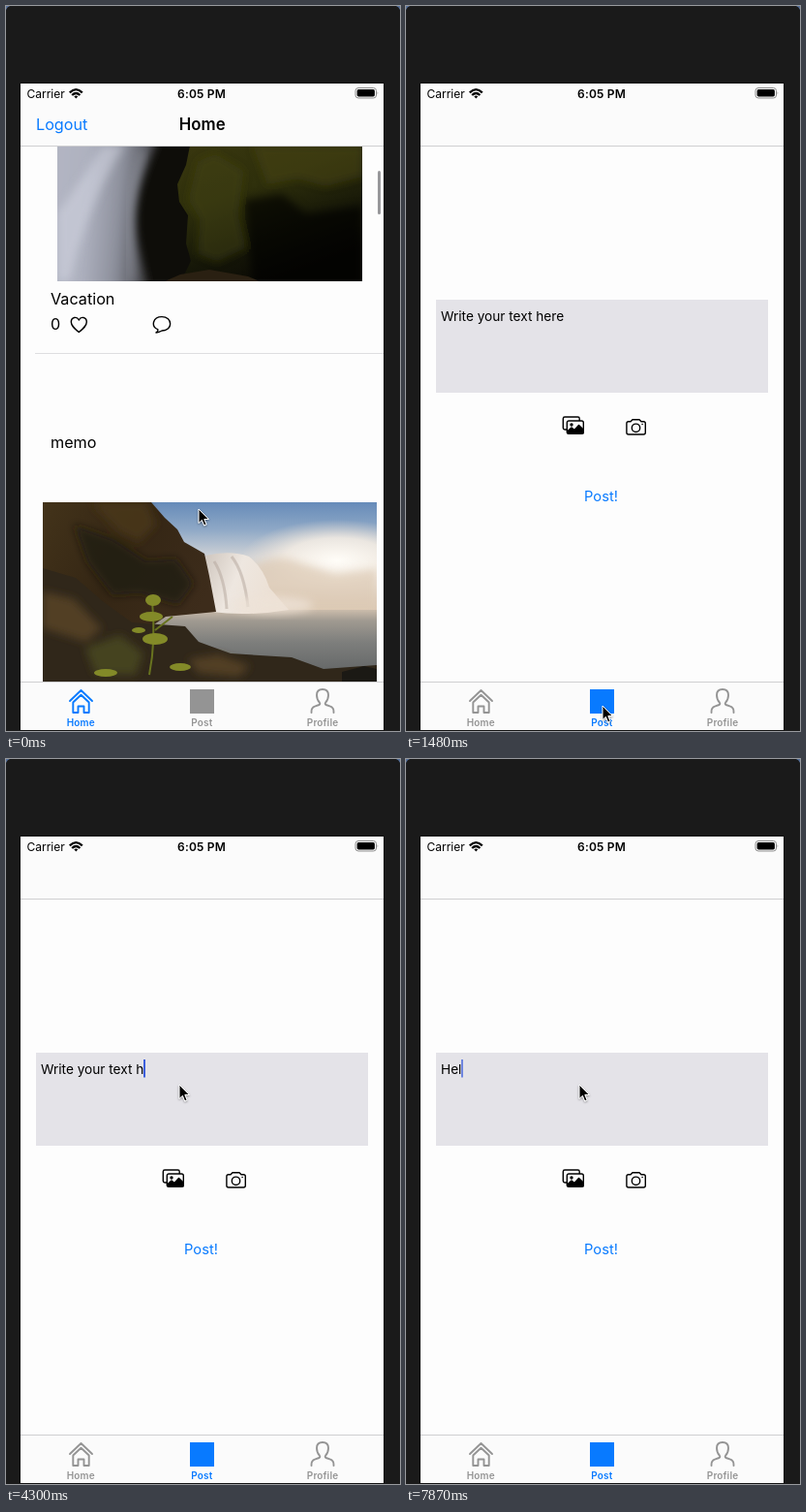
Animation of 407 by 748 pixels, one loop 8000 ms. Source, as an HTML page:

```html
<!DOCTYPE html>
<html lang="en">
<head>
<meta charset="utf-8">
<title>Photo feed</title>
<style>
  html, body { margin: 0; width: 100%; height: 100%; overflow: hidden; background: #1a1a1a; }
  #stage { display: block; width: 100%; height: 100%; }
  text { font-family: Inter, sans-serif; font-size: 16.2px; fill: #000; white-space: pre; }
  .mid { text-anchor: middle; }
  .bold { font-weight: 600; }
  .status { font-size: 12px; }
  .field { font-size: 13.65px; }
  .tab { color: #949494; }
  .tab.on { color: #087aff; }
  .tab text { font-size: 10px; font-weight: 600; letter-spacing: .15px; fill: currentColor; }
  .line { fill: none; stroke: #000; stroke-width: 1.4; stroke-linejoin: round; stroke-linecap: round; }
  .tab .line { stroke: currentColor; stroke-width: 1.9; }
  .link { fill: #087aff; }
</style>
</head>
<body>
<svg id="stage" viewBox="0 0 407 748" preserveAspectRatio="none">
  <defs>
    <linearGradient id="stream" x1="0" y1="0" x2="1" y2=".12">
      <stop offset="0" stop-color="#b4b7c4"/><stop offset=".4" stop-color="#aeb1bf"/>
      <stop offset=".68" stop-color="#8d909c"/><stop offset=".88" stop-color="#56575d"/>
      <stop offset="1" stop-color="#1d1a17"/>
    </linearGradient>
    <linearGradient id="moss" x1="0" y1="0" x2=".5" y2="1">
      <stop offset="0" stop-color="#39370f"/><stop offset=".4" stop-color="#2f300c"/>
      <stop offset=".75" stop-color="#161708"/><stop offset="1" stop-color="#0b0a05"/>
    </linearGradient>
    <linearGradient id="sky" x2="0" y2="1">
      <stop offset="0" stop-color="#668bb9"/><stop offset=".15" stop-color="#8ea8c6"/>
      <stop offset=".3" stop-color="#cfd2d6"/><stop offset=".45" stop-color="#e9dfd4"/>
      <stop offset=".6" stop-color="#dccab5"/>
    </linearGradient>
    <radialGradient id="glow">
      <stop offset="0" stop-color="#fffdf8"/><stop offset=".55" stop-color="#f6eee4" stop-opacity=".85"/>
      <stop offset="1" stop-color="#e9ddd0" stop-opacity="0"/>
    </radialGradient>
    <linearGradient id="lake" x2="0" y2="1">
      <stop offset="0" stop-color="#cbbcab"/><stop offset=".15" stop-color="#a09a91"/>
      <stop offset=".45" stop-color="#7d7e7c"/><stop offset="1" stop-color="#5c5f60"/>
    </linearGradient>
    <linearGradient id="cliff" x2="1" y2=".5">
      <stop offset="0" stop-color="#43331a"/><stop offset=".5" stop-color="#342614"/>
      <stop offset="1" stop-color="#3d2c1b"/>
    </linearGradient>
    <linearGradient id="fall" x2="1" y2=".3">
      <stop offset="0" stop-color="#cfc6be"/><stop offset=".45" stop-color="#eee7e0"/>
      <stop offset="1" stop-color="#ecdfd2"/>
    </linearGradient>
    <filter id="haze" x="-30%" y="-30%" width="160%" height="160%"><feGaussianBlur stdDeviation="4"/></filter>
    <filter id="soft" x="-50%" y="-50%" width="200%" height="200%">
      <feDropShadow dx="0" dy="1" stdDeviation=".9" flood-opacity=".4"/>
    </filter>
  </defs>

  <rect width="407" height="748" fill="#1a1a1a"/>
  <path d="M0 0h4Q1 1 0 4zM407 0h-4q3 1 4 4z" fill="#566f98"/>
  <rect x="14" y="79" width="377" height="669" fill="#151515"/>
  <rect x="15" y="80" width="375" height="667" fill="#fdfdfd"/>

  <g id="home">
    <svg x="53" y="144" width="315" height="140" viewBox="53 144 315 140">
      <rect x="53" y="144" width="315" height="140" fill="#0e0d09"/>
      <path d="M40 130H162Q136 180 134 214T152 300H40z" fill="url(#stream)" filter="url(#haze)"/>
      <path d="M53 214Q86 168 100 144H122Q84 205 66 284H53z" fill="#d5d8e4" opacity=".5" filter="url(#haze)"/>
      <path d="M142 150Q124 195 130 284" fill="none" stroke="#c0c3cf" stroke-width="5" opacity=".3" filter="url(#haze)"/>
      <path d="M190 144L186 164L177 184L179 202L188 216L186 245L191 263L181 284H368V144z" fill="url(#moss)"/>
      <g filter="url(#haze)">
        <path d="M198 160L216 152L246 170L240 215L248 250L218 264L198 256L200 220L188 200z" fill="#464711" opacity=".45"/>
        <path d="M255 144H368V176L330 186L302 178L270 184z" fill="#474515" opacity=".55"/>
        <path d="M246 200L285 194L310 214L368 206V290H255z" fill="#080904" opacity=".65"/>
      </g>
      <path d="M164 284L180 277L210 272L250 279L262 284z" fill="#2a2012"/>
    </svg>
    <text x="46" y="308">Vacation</text>
    <text x="46" y="334">0</text>
    <path class="line" d="M75.300 336.500C71 333 67.300 330 67.300 326C67.300 320.800 73.300 319.800 75.300 324C77.300 319.800 83.300 320.800 83.300 326C83.300 330 79.600 333 75.300 336.500z"/>
    <path class="line" d="M155 337Q157.200 336 156.800 333.700C149.500 330.500 151.500 320.600 161 320.600C172.200 320.600 172.800 335 161 335Q158 336.900 155 337z"/>
    <rect x="30" y="358" width="360" height="1" fill="#dedee0"/>
    <text x="46" y="456">memo</text>

    <svg x="38" y="512" width="345" height="186" viewBox="38 512 345 186">
      <rect x="38" y="512" width="345" height="186" fill="url(#sky)"/>
      <ellipse cx="342" cy="572" rx="100" ry="42" fill="url(#glow)"/>
      <path d="M250 582Q268 568 290 570L315 578L340 586L383 581V626H250z" fill="#dcc9b4" opacity=".7" filter="url(#haze)"/>
      <rect x="150" y="623" width="233" height="75" fill="url(#lake)"/>
      <path d="M206 567Q232 561 251 568Q266 580 272 600L292 623Q250 630 212 625z" fill="url(#fall)"/>
      <path d="M215 573Q226 590 228 622M233 568Q246 584 250 620" fill="none" stroke="#b3a69b" stroke-width="3" opacity=".5"/>
      <ellipse cx="275" cy="618" rx="42" ry="9" fill="#eee3d8" opacity=".75" filter="url(#haze)"/>
      <path d="M38 512H150L164 528L177 540L184 553L205 565L210 588L217 625L165 630L120 660L38 670z" fill="url(#cliff)"/>
      <g filter="url(#haze)">
        <path d="M88 512H146L155 535L137 553L116 542z" fill="#4c3a19" opacity=".8"/>
        <path d="M70 535L112 550L145 572L176 570L194 596L178 618L138 606L110 608L84 574z" fill="#20180e" opacity=".7"/>
      </g>
      <path d="M38 580L72 590L101 615L130 636L185 640L199 656L232 668L295 672L328 684L383 680V698H38z" fill="#30271a"/>
      <g filter="url(#haze)">
        <path d="M38 604L70 612L99 642L83 656L38 642zM188 674L220 669L252 681L240 692L199 688z" fill="#5a4428" opacity=".8"/>
        <path d="M82 662L118 649L142 668L134 690L92 689z" fill="#4b4a1e" opacity=".8"/>
      </g>
      <path d="M347 698V687L370 681L383 684V698z" fill="#1b1914"/>
      <path d="M148 690Q155 655 151 614M154 644L172 630" fill="none" stroke="#68731f" stroke-width="2"/>
      <g fill="#838a28">
        <ellipse cx="152" cy="613" rx="8" ry="6"/><ellipse cx="150" cy="630" rx="12" ry="5"/>
        <ellipse cx="154" cy="653" rx="13" ry="6"/><ellipse cx="137" cy="644" rx="7" ry="3"/>
        <ellipse cx="103" cy="688" rx="12" ry="4"/><ellipse cx="180" cy="682" rx="11" ry="4"/>
      </g>
    </svg>
    <rect id="scrollbar" x="384" y="170" width="3" height="45" rx="1.500" fill="#98989b"/>
  </g>

  <g id="post">
    <rect x="31" y="303" width="343" height="96" fill="#e4e3e8"/>
    <text id="entry" class="field" x="36" y="324.500"></text>
    <rect id="caret" y="310" width="2" height="18.500" fill="#3d5fdc"/>
    <g class="line">
      <path d="M166 437H164Q162.300 437 162.300 435.300V425.700Q162.300 424 164 424H177.500Q179.200 424 179.200 425.700V428"/>
      <rect x="166.300" y="428" width="17" height="13.200" rx="2" fill="#fdfdfd"/>
      <path d="M166.500 439L171 435L174 437.500L178.500 432.500L183.200 437V440.800H167z" fill="#000"/>
      <circle cx="171" cy="432" r="1" fill="#000"/>
    </g>
    <g class="line">
      <path d="M229.800 428.800H232L234 426.700H241L243 428.800H245.400Q247.300 428.800 247.300 430.700V440Q247.300 442 245.400 442H229.800Q227.900 442 227.900 440V430.700Q227.900 428.800 229.800 428.800z"/>
      <circle cx="237.500" cy="435.300" r="4.200"/><path d="M244 431.500h.2"/>
    </g>
    <text class="mid link" x="201.500" y="510.500" style="font-size:14.700px">Post!</text>
  </g>

  <rect x="15" y="80" width="375" height="64" fill="#fbfbfb"/>
  <rect x="15" y="144" width="375" height="1" fill="#cfcfd1"/>
  <text class="status" x="21.500" y="94.500">Carrier</text>
  <g fill="none" stroke="#000" stroke-width="2.300">
    <path d="M65.800 89.300Q72.300 83 78.800 89.300M68.200 92Q72.300 88 76.400 92"/>
    <path d="M70.300 93.300Q72.300 91.800 74.300 93.300L72.300 95.600z" fill="#000" stroke="none"/>
  </g>
  <text class="status bold mid" x="202" y="94.500" style="letter-spacing:.2px">6:05 PM</text>
  <rect x="361" y="84.500" width="21.500" height="10.500" rx="3" fill="none" stroke="#8f8f8f"/>
  <rect x="362.600" y="86.100" width="18.300" height="7.300" rx="1.600"/>
  <path d="M383.600 88q1.500 1.700 0 3.500z" fill="#8f8f8f"/>
  <g id="title">
    <text class="link" x="31" y="128">Logout</text>
    <text class="bold mid" x="202.700" y="128" style="font-size:16.800px">Home</text>
  </g>

  <rect x="15" y="697" width="375" height="50" fill="#fbfbfb"/>
  <rect x="15" y="697" width="375" height="1" fill="#cfcfd1"/>
  <g id="homeTab" class="tab">
    <path class="line" d="M66 717L77.500 706L89 717M69.300 718.500V729H74.500V722.500H80.500V729H85.700V718.500M69.500 718.300L77.500 710.800L85.500 718.300"/>
    <text class="mid" x="77.300" y="743">Home</text>
  </g>
  <g id="postTab" class="tab">
    <rect x="190" y="705" width="25" height="25" fill="currentColor"/>
    <text class="mid" x="202.300" y="743">Post</text>
  </g>
  <g class="tab">
    <path class="line" d="M315.500 729Q315 723.500 319.500 722.300L323.500 721Q325 720 323.800 718.500Q321 715.500 321 711Q321 705 327 705Q333 705 333 711Q333 715.500 330.200 718.500Q329 720 330.500 721L334.500 722.300Q339 723.500 338.500 729"/>
    <text class="mid" x="327" y="743">Profile</text>
  </g>

  <path id="cursor" d="M0 0V14.500L3.400 11.400L5.700 17L8.100 16L5.800 10.500H10.400z" fill="#000" stroke="#fff" stroke-width="1" filter="url(#soft)"/>
</svg>
<script>
const LOOP = 8000, POST_AT = 1480, CARET_AT = 3110;
const PROMPT = 'Write your text here', REPLY = 'Hel';
const $ = id => document.getElementById(id);

// [time, x, y]; the pointer is off stage where y exceeds 748
const pointer = [
  [0, 199, 519], [150, 199, 598], [300, 199, 800], [600, 202, 729], [740, 202, 725],
  [1040, 202, 724], [1190, 203, 722], [1930, 201, 690], [2080, 188, 540], [2220, 179, 404],
  [2510, 180, 363], [2660, 180, 347], [2810, 179, 336]
];
// [time, letters left of the prompt]
const erasing = [
  [0, 20], [3700, 19], [4300, 17], [4450, 16], [4590, 15], [4740, 13], [4890, 11], [5040, 10],
  [5180, 8], [5330, 7], [5480, 6], [5630, 4], [5770, 3], [5920, 1], [6070, 0]
];
// [time, letters typed]
const typing = [[0, 0], [6670, 1], [7120, 2], [7720, 3]];
const scrollFade = [[0, 1], [1040, .4], [1190, 0]];

const at = (steps, t) => steps.findLast(step => step[0] <= t).slice(1);
const show = (id, on) => $(id).setAttribute('visibility', on ? 'visible' : 'hidden');

function render(t) {
  const posting = t >= POST_AT;
  show('home', !posting);
  show('title', !posting);
  show('post', posting);
  $('homeTab').classList.toggle('on', !posting);
  $('postTab').classList.toggle('on', posting);
  $('scrollbar').setAttribute('opacity', at(scrollFade, t)[0]);

  const entry = $('entry');
  entry.textContent = PROMPT.slice(0, at(erasing, t)[0]) + REPLY.slice(0, at(typing, t)[0]);
  const width = entry.textContent ? entry.getComputedTextLength() : 0;
  $('caret').setAttribute('x', Math.round(35.5 + width));
  $('caret').setAttribute('opacity', t >= 7870 ? .7 : 1);
  show('caret', t >= CARET_AT);

  $('cursor').setAttribute('transform', `translate(${at(pointer, t)})`);
}

const start = performance.now();
function tick() {
  render((performance.now() - start) % LOOP);
  requestAnimationFrame(tick);
}
tick();
</script>
</body>
</html>
```
